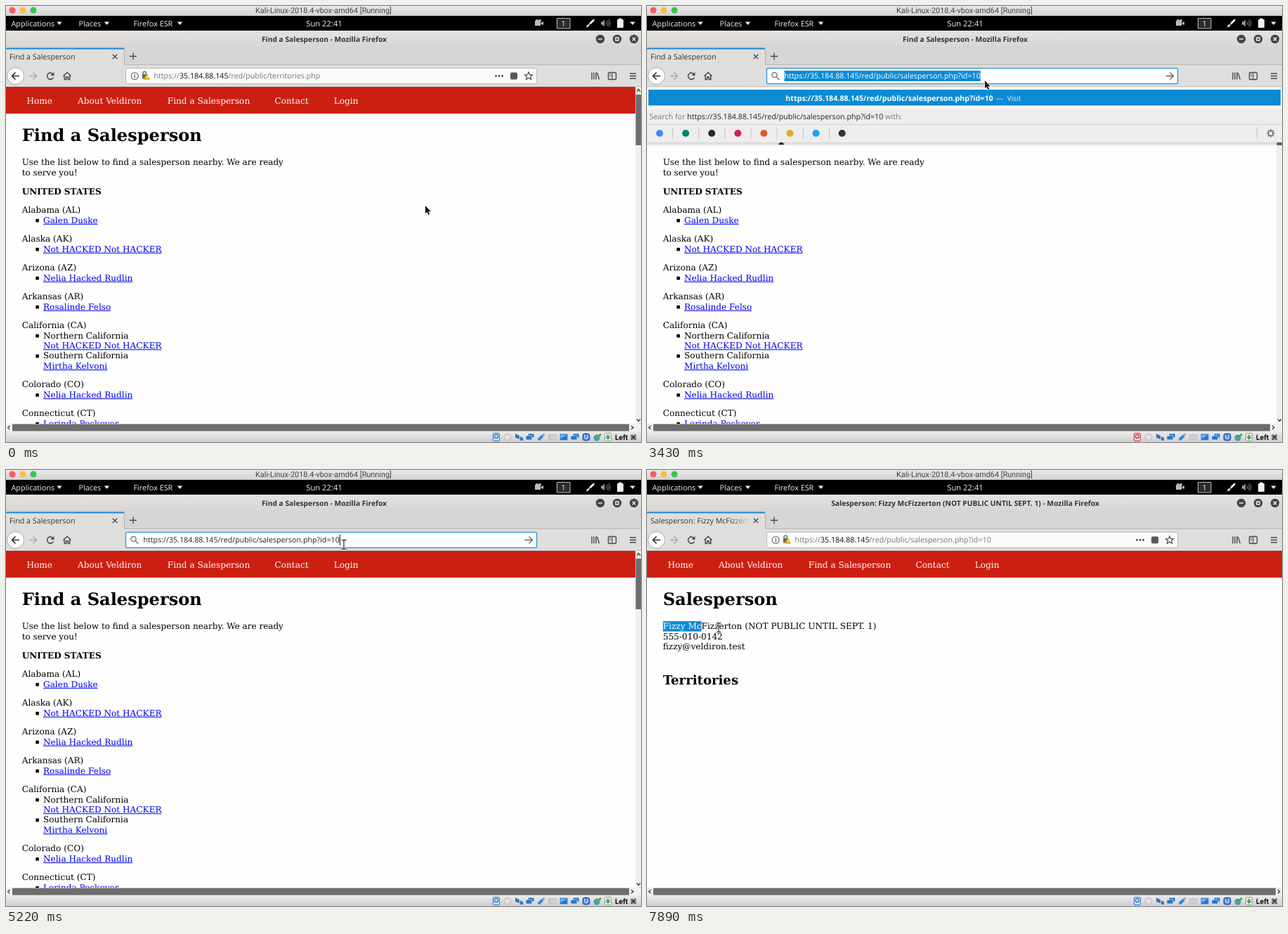
An HTML page with a canvas that plays this animation: 904x620 px, repeating every 8 s.

```html
<!DOCTYPE html>
<html lang="en">
<head>
<meta charset="utf-8">
<title>Find a Salesperson</title>
<style>
  html, body { margin: 0; width: 100%; height: 100%; overflow: hidden; background: #fff; }
  canvas { display: block; }
</style>
</head>
<body>
<canvas id="stage" width="904" height="620"></canvas>
<script>
const ctx = document.getElementById('stage').getContext('2d');
ctx.textRendering = 'geometricPrecision';

const LOOP = 8000, TICK = 148.75;
const SANS = '"Open Sans", "Noto Sans", sans-serif', SERIF_FAMILY = '"DejaVu Serif", serif';
const UI = `10.69px ${SANS}`, UI_BOLD = `bold 10.72px ${SANS}`, TITLE = `bold 10.25px ${SANS}`;
const PANEL = `10.85px ${SANS}`;
const SERIF = `12.1px ${SERIF_FAMILY}`, PARAGRAPH = `12.02px ${SERIF_FAMILY}`;
const H1 = `bold 24.1px ${SERIF_FAMILY}`, H2 = `bold 18.1px ${SERIF_FAMILY}`;
const BLUE = '#0c8ad4', INK = '#222', GRAY = '#77787a', ICON = '#4a4a4c';

const HOST = '35.184.88.145';
const BASE = `https://${HOST}/red/public/`;
const OLD_FILE = 'territories.php', NEW_FILE = 'salesperson.php?id=10';
const PERSON = 'Fizzy McFizzerton (NOT PUBLIC UNTIL SEPT. 1)';

// ---- drawing helpers ----
function rect(x, y, w, h, fill) { ctx.fillStyle = fill; ctx.fillRect(x, y, w, h); }

function box(x, y, w, h, r, fill, stroke, width = 1) {
  ctx.beginPath();
  ctx.roundRect(x, y, w, h, r);
  if (fill) { ctx.fillStyle = fill; ctx.fill(); }
  if (stroke) { ctx.strokeStyle = stroke; ctx.lineWidth = width; ctx.stroke(); }
}

function disc(x, y, r, fill, stroke, width = 1) { box(x - r, y - r, 2 * r, 2 * r, r, fill, stroke, width); }

function line(path, color, width = 1.4, x = 0, y = 0) {
  ctx.save();
  ctx.translate(x, y);
  ctx.strokeStyle = color;
  ctx.lineWidth = width;
  ctx.stroke(new Path2D(path));
  ctx.restore();
}

function shape(path, color, x = 0, y = 0) {
  ctx.save();
  ctx.translate(x, y);
  ctx.fillStyle = color;
  ctx.fill(new Path2D(path));
  ctx.restore();
}

function vertical(y0, y1, c0, c1) {
  const g = ctx.createLinearGradient(0, y0, 0, y1);
  g.addColorStop(0, c0);
  g.addColorStop(1, c1);
  return g;
}

function widthOf(s, font) { ctx.font = font; return ctx.measureText(s).width; }

function text(s, x, y, color = '#000', font = SERIF, align = 'left') {
  ctx.font = font;
  ctx.fillStyle = color;
  ctx.textAlign = align;
  ctx.fillText(s, x, y);
}

// Text in several colours; a third entry in a part is its highlight [top, height].
function runs(x, y, font, parts) {
  for (const [s, color, mark] of parts) {
    const w = widthOf(s, font);
    if (mark) rect(x, mark[0], w, mark[1], BLUE);
    text(s, x, y, color, font);
    x += w;
  }
  return x;
}

// ---- motion ----
const PATH = [[0, 597, 284], [7, 377, 105], [8, 377, 101], [10, 377, 101],
              [14, 481, 106], [42, 481, 106], [49, 23, 224], [53, 102, 224]];

function pointer(k) {
  const i = PATH.findIndex(p => p[0] > k);
  if (i < 0) return PATH.at(-1).slice(1);
  const [k0, x0, y0] = PATH[i - 1], [k1, x1, y1] = PATH[i];
  const u = (k - k0) / (k1 - k0), e = u * u * (3 - 2 * u);
  return [x0 + (x1 - x0) * e, y0 + (y1 - y0) * e];
}

function drawPointer(k, [x, y]) {
  const inUrl = x > 170 && x < 756 && y > 88 && y < 111;
  if ((inUrl && (k < 22 || k > 28)) || k >= 48) {
    const beam = 'M-3.5-6.5H-1L0-5.5L1-6.5H3.5M0-5.5V5.5M-3.5 6.5H-1L0 5.5L1 6.5H3.5';
    line(beam, '#fff', 2.4, x, y);
    line(beam, '#111', 1.1, x, y);
  } else {
    const arrow = 'M0 0V11L2.5 8.8L4.4 13L6.2 12.2L4.4 8.2H7.8Z';
    line(arrow, '#fff', 1.6, x, y);
    shape(arrow, '#0a0a0a', x, y);
  }
}

// ---- desktop ----
function drawDesktop() {
  rect(0, 0, 904, 14, vertical(0, 14, '#e9e9e9', '#d2d2d2'));
  ['#fc5b57', '#fdbc40', '#34c84a'].forEach((c, i) => disc(9 + 15 * i, 6, 4.5, c));
  text('Kali-Linux-2018.4-vbox-amd64 [Running]', 452, 10, '#444', '10.88px Roboto, sans-serif', 'center');

  rect(0, 14, 904, 21, '#000');
  for (const [s, x, tip] of [['Applications', 7.5, 76], ['Places', 103.5, 143.5], ['Firefox ESR', 181.5, 247.5]]) {
    text(s, x, 28.5, '#eee', PANEL);
    shape('M-3.7-2H3.7L0 2.4Z', '#eee', tip, 24.5);
  }
  text('Sun 22:41', 453, 28.5, '#eee', `11.2px ${SANS}`, 'center');
  shape('M0 4H8V11H0ZM8.5 7L12 5V10L8.5 8.5Z', '#bbb', 753, 17);
  disc(756, 21, 2, '#bbb');
  disc(760, 21, 2, '#bbb');
  box(784.5, 17.5, 18.5, 14.5, 0, '#2c2c2c', '#bbb');
  text('1', 793.7, 28.5, '#eee', PANEL, 'center');
  shape('M6-6L3-5L-2 0L0 2L5-3ZM-2 1L-5 3L-6 6L-3 5L-1 2Z', '#eee', 832, 24.5);
  shape('M0-2H2L5-5V5L2 2H0Z', '#999', 847, 24.5);
  line('M7-2Q8.5 0 7 2M9-4Q11.5 0 9 4M11-5.5Q14.5 0 11 5.5', '#777', 1.1, 847, 24.5);
  box(870, 19, 9, 12, 1, '#eee');
  rect(872.5, 17.5, 4, 2, '#eee');
  shape('M-3.7-2H3.7L0 2.4Z', '#eee', 892, 24.5);
}

function drawStatusIcons(k) {
  rect(0, 605, 904, 15, vertical(605, 620, '#ececec', '#cfcfcf'));
  const blue = '#2479cf', pale = '#cfe3f6', red = '#d9342b';
  const screen = (x, c) => {
    box(x - 3, 608, 9, 6, 1, c, '#fff', 0.6);
    box(x - 6, 611, 9, 6, 1, c, '#fff', 0.6);
  };
  const disk = k === 23 ? red : blue;
  box(693.5, 607.5, 9, 11, 1.5, pale, disk);
  disc(698, 612, 2.5, '#fff', disk, 1.4);
  disc(714, 613, 5, '#d9d9d9', '#bcbcbc');
  disc(714, 613, 1.5, '#f4f4f4');
  shape('M-5-5L1-2V3L-5 1ZM2-1L6 1V5L2 5Z', '#3a76b8', 730, 613);
  screen(746, k >= 38 && k < 41 ? red : blue);
  line('M-4 4L2-2', '#3a87d6', 4, 762, 613);
  line('M2-2L4.5-4.5', '#8aa9c6', 3, 762, 613);
  box(772.5, 609.5, 11, 7, 1, '#d0d0d0', '#bdbdbd');
  box(788.5, 608.5, 11, 9, 1, blue, '#8db7e2');
  shape('M0 0H9L0 6Z', '#6fb3f0', 789.5, 609.5);
  screen(810, blue);
  box(821, 608, 10, 10, 3, '#4c79d8', '#2c56ad');
  line('M-2-3V1Q0 4 2 1V-3', '#fff', 1.2, 826, 613);
  disc(841, 614, 4.5, '#3f93d2');
  line('M-4 4L4-4', '#55b035', 3, 843, 612.5);
  box(852.5, 607.5, 9, 11, 1, '#e8efe8', '#8a9a9a');
  shape('M-1.5-3H1.5V0H3.5L0 4L-3.5 0H-1.5Z', '#3fa535', 857, 613);
  text('Left', 867, 617, '#111', 'bold 10.3px Roboto, sans-serif');
  text('⌘', 888.5, 617, '#111', 'bold 10px "DejaVu Sans", sans-serif');
}

// ---- browser ----
function drawFrame(k) {
  const loading = k >= 38 && k < 41, renamed = k >= 39;
  rect(0, 35, 904, 25, vertical(35, 60, '#e3e2e1', '#d6d5d4'));
  rect(0, 60, 904, 24, '#d6d5d4');
  rect(0, 83, 904, 1, '#b9b8b7');
  rect(0, 84, 904, 31, '#dfdedd');
  rect(0, 60, 168, 24, '#dfdedd');
  rect(0, 59.5, 168, 2, '#1689d6');
  rect(168, 61, 1, 22, '#b4b3b2');
  rect(0, 114, 904, 1, '#c4c3c2');

  const heading = renamed ? 'Salesperson: ' + PERSON : 'Find a Salesperson';
  text(heading + ' - Mozilla Firefox', 453, 50.5, '#333', TITLE, 'center');
  for (const [x, glyph] of [[846, 'M-3 0H3'], [870, 'M-2-2H2V2H-2Z'], [894, 'M-2.2-2.2L2.2 2.2M2.2-2.2L-2.2 2.2']]) {
    disc(x, 47, 6.2, '#474747');
    line(glyph, '#eee', 1.4, x, 47);
  }

  const fade = ctx.createLinearGradient(118, 0, 147, 0);
  fade.addColorStop(0, '#333');
  fade.addColorStop(1, 'rgba(51,51,51,0)');
  ctx.save();
  ctx.beginPath();
  ctx.rect(0, 62, 147, 21);
  ctx.clip();
  text(heading, loading ? 21.5 : 5, 75.7, renamed ? fade : '#333', UI);
  ctx.restore();
  if (loading) disc(9.5, 72, 1.5, '#888');
  line('M-3.3-3.3L3.3 3.3M3.3-3.3L-3.3 3.3', ICON, 1.3, 155, 72);
  line('M-5 0H5M0-5V5', ICON, 1.3, 181, 71.5);

  disc(13.5, 99.5, 12, '#fcfcfc', '#aaa');
  line('M5.5 0H-5M0-5L-5 0L0 5', '#333', 1.7, 13.5, 99.5);
  line('M-5.5 0H5M0-5L5 0L0 5', '#aaa', 1.5, 38.5, 99.5);
  if (loading) {
    line('M-2 4.2A4.6 4.6 0 1 1 2 4.2', ICON, 1.6, 62.5, 99.5);
  } else {
    line('M4.2-2A4.6 4.6 0 1 0 4.4 2', ICON, 1.6, 63, 99.5);
    shape('M5.5-5.5V-.5H.5Z', ICON, 63, 99.5);
  }
  line('M-5.5 0L0-5L5.5 0M-3.8-1V5H-1.3V1.5H1.3V5H3.8V-1', ICON, 1.5, 87, 99.5);

  line('M-5-5V5M-2-5V5M1-5V5M2.5-4.5L5.5 5', ICON, 1.4, 839, 99.5);
  box(857.5, 94.5, 11, 10, 1.5, null, ICON, 1.4);
  line('M0-5V5M-4-2.5H-1.5M-4 0H-1.5', ICON, 1.1, 863, 99.5);
  line('M-4.5-3.5H4.5M-4.5 0H4.5M-4.5 3.5H4.5', ICON, 1.4, 892.5, 99.5);
}

function drawUrlBar(k, x) {
  const focused = k >= 10 && k < 38, typed = k >= 23 && k < 38;
  const file = k >= 23 ? NEW_FILE : OLD_FILE, mark = [92, 15], y = 103.4;
  box(170.5, 88.5, 585, 22, 2, focused ? '#fff' : '#fafafa', focused ? '#3c9ddc' : '#b9b8b7', focused ? 1.5 : 1);

  if (typed) {
    disc(181.5, 98, 3.6, null, GRAY, 1.5);
    line('M2.5 2.5L7 7', GRAY, 1.6, 181.5, 98);
    line('M-5.5 0H5.5M.5-5L5.5 0L.5 5', '#666', 1.4, 744, 99.5);
    const selected = k < 30;
    const end = runs(195.5, y, UI, [[BASE + file, selected ? '#fff' : INK, selected && mark]]);
    if (!selected && k !== 34) rect(end, 92, 1, 15, '#000');
    return;
  }

  disc(183.3, 99.5, 5, null, '#666', 1.1);
  rect(182.6, 96.5, 1.4, 1.4, '#666');
  rect(182.6, 98.8, 1.4, 3.6, '#666');
  line('M-2.5-1V-3A2.3 2.3 0 0 1 2-3V-1', '#666', 1.4, 197.5, 98);
  rect(194, 97, 7.5, 6.5, '#666');
  shape('M0-4.5L4.5 4H-4.5Z', '#f4b300', 200.5, 101);
  rect(200, 99.5, 1, 3, '#fff');

  if (focused) {
    const start = 210.5 + widthOf(BASE, UI);
    let n = 0;
    while (k > 10 && n < file.length && start + widthOf(file.slice(0, n + 1), UI) <= x) n++;
    runs(210.5, y, UI, [[BASE, INK], [file.slice(0, n), '#fff', mark], [file.slice(n), INK]]);
  } else {
    runs(210.5, y, UI, [['https://', GRAY], [HOST, '#111'], ['/red/public/' + file, GRAY]]);
  }

  if (k >= 7 && k <= 42) line('M-3.5-2L0 1.8L3.5-2', '#666', 1.3, 680, 99.5);
  for (const dx of [-4.5, 0, 4.5]) disc(702 + dx, 99.5, 1.4, ICON);
  box(718, 94.5, 10, 10, 2, '#58585a');
  line('M0-5.5L1.6-1.8L5.5-1.6L2.5 1L3.5 5L0 2.8L-3.5 5L-2.5 1L-5.5-1.6L-1.6-1.8Z', ICON, 1.2, 744, 99.5);
}

function drawPopup() {
  const url = BASE + NEW_FILE;
  rect(0, 194, 904, 5, vertical(194, 199, 'rgba(0,0,0,.16)', 'rgba(0,0,0,.03)'));
  rect(0, 115, 904, 79, '#f5f5f5');
  rect(2, 119, 900, 22.5, BLUE);
  const end = runs(197.3, 135, UI_BOLD, [[url, '#fff']]);
  text('—  Visit', end + 4.5, 135, '#e4f2fb', `10.2px ${SANS}`);
  rect(0, 147, 904, 47, '#ededed');
  runs(3.5, 161, UI, [['Search for ', GRAY], [url, INK], [' with:', GRAY]]);
  rect(0, 168, 904, 1, '#d2d2d2');
  ['#4285f4', '#008373', '#2a2a2a', '#d0205c', '#de5833', '#e0a92f', '#1da1f2', '#333'].forEach((c, i) => {
    disc(18 + 37.1 * i, 181, 5, c);
    if (i < 7) rect(36 + 37.2 * i, 173, 1, 16, '#c4c4c4');
  });
  rect(868, 173, 1, 16, '#c4c4c4');
  disc(888, 181, 3.4, null, '#777', 1.8);
  for (let i = 0; i < 8; i++) {
    const a = i * Math.PI / 4, c = Math.cos(a), s = Math.sin(a);
    line(`M${4 * c} ${4 * s}L${6 * c} ${6 * s}`, '#777', 1.7, 888, 181);
  }
}

// ---- page ----
const STATES = [
  ['Alabama (AL)', 'Galen Duske'],
  ['Alaska (AK)', 'Not HACKED Not HACKER'],
  ['Arizona (AZ)', 'Nelia Hacked Rudlin'],
  ['Arkansas (AR)', 'Rosalinde Felso'],
  ['California (CA)', '-Northern California', 'Not HACKED Not HACKER', '-Southern California', 'Mirtha Kelvoni'],
  ['Colorado (CO)', 'Nelia Hacked Rudlin'],
  ['Connecticut (CT)', 'Lorinda Peckover'],
];
const LINE = 14.4, LEFT = 22.7;

function drawList() {
  text('Find a Salesperson', LEFT, 191.8, '#000', H1);
  text('Use the list below to find a salesperson nearby. We are ready', LEFT, 226.3, '#000', PARAGRAPH);
  text('to serve you!', LEFT, 240.7, '#000', PARAGRAPH);
  text('UNITED STATES', LEFT, 267.8, '#000', 'bold ' + SERIF);
  let y = 294.2;
  for (const [state, ...items] of STATES) {
    text(state, LEFT, y);
    items.forEach((item, i) => {
      y += LINE;
      const region = item[0] === '-';
      if (region || !i) rect(42.3, y - 5.8, 4.6, 4.6, '#000');
      if (region) return text(item.slice(1), 53, y);
      text(item, 53, y, '#0000ee');
      rect(53, y + 1.2, widthOf(item, SERIF), 1, '#0000ee');
    });
    y += 26.6;
  }
}

function drawPerson(k) {
  const n = Math.max(0, 2 * (k - 49));
  text('Salesperson', LEFT, 191.8, '#000', H1);
  runs(LEFT, 226.3, SERIF, [[PERSON.slice(0, n), '#fff', [215, 14.6]], [PERSON.slice(n), '#000']]);
  text('555-010-0142', LEFT, 226.3 + LINE);
  text('fizzy@veldiron.test', LEFT, 226.3 + 2 * LINE);
  text('Territories', LEFT, 305, '#000', H2);
}

function drawPage(k) {
  const second = k >= 41, right = second ? 904 : 896;
  rect(0, 115, 904, 490, '#fefefe');
  rect(0, 115, right, 38, '#cb1f11');
  [['Home', 29.5], ['About Veldiron', 102], ['Find a Salesperson', 229.8], ['Contact', 382.5], ['Login', 466.8]]
    .forEach(([s, x]) => text(s, x, 139.2, '#fff'));
  if (second) drawPerson(k); else drawList();

  rect(0, 594, 904, 11, '#f0f0f0');
  rect(9, 594.5, right - 18, 10, '#6d6d6d');
  line('M1.5-2.5L-1.5 0L1.5 2.5', '#333', 1.2, 4, 599.5);
  line('M-1.5-2.5L1.5 0L-1.5 2.5', '#333', 1.2, right - 4.5, 599.5);
  if (!second) {
    rect(896, 115, 8, 479, '#f0f0f0');
    rect(896.5, 126, 7.5, 72, '#6d6d6d');
    line('M-2.5 1.5L0-1.5L2.5 1.5', '#333', 1.2, 900.5, 120);
    line('M-2.5-1.5L0 1.5L2.5-1.5', '#333', 1.2, 900.5, 589);
  }
  if (k >= 38 && !second) {
    box(-1, 587.5, 243.5, 18.5, [0, 2, 0, 0], '#dcdbda', '#b0afae');
    text(`Waiting for ${HOST}…`, 2, 600.3, '#444', UI);
  }
}

function draw(time) {
  const k = Math.floor(time / TICK), at = pointer(k);
  drawPage(k);
  drawDesktop();
  drawFrame(k);
  drawUrlBar(k, at[0]);
  if (k >= 23 && k < 28) drawPopup();
  drawStatusIcons(k);
  drawPointer(k, at);
}

function tick() {
  draw(performance.now() % LOOP);
  requestAnimationFrame(tick);
}
tick();
</script>
</body>
</html>
```
